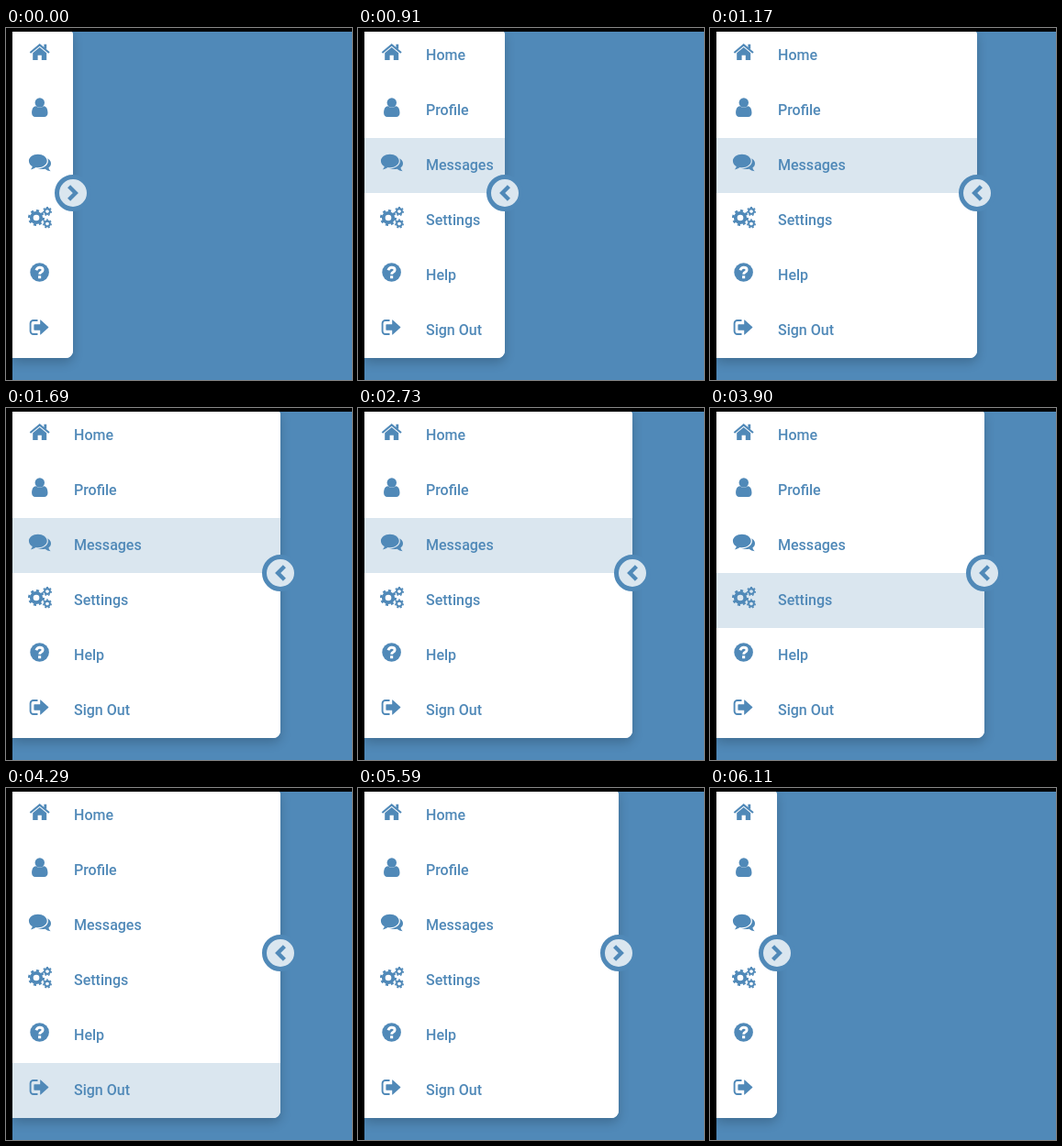
Animation, 377 px wide and 384 px high, one loop 7410 ms. Source, as an HTML page:

```html
<!DOCTYPE html>
<html lang="en">
<head>
<meta charset="utf-8">
<title>Expanding sidebar</title>
<style>
  :root { --blue: #5089b8; --tint: #dae6ef; }
  html, body { margin: 0; width: 100%; height: 100%; overflow: hidden; background: #000; }
  #stage {
    position: absolute; left: 7px; top: 4px; width: 370px; height: 380px;
    overflow: hidden; background: var(--blue);
  }
  #panel {
    position: absolute; left: 0; top: -4px; width: 66px; height: 360px;
    border-radius: 0 8px 8px 0; box-shadow: 0 5px 12px rgba(0, 0, 0, .2);
  }
  ul {
    margin: 0; padding: 0; width: 100%; height: 100%; list-style: none;
    overflow: hidden; border-radius: inherit; background: #fff;
  }
  li {
    --row: #fff; position: relative; height: 60px; background: var(--row);
    font: 500 16px/60px Roboto, sans-serif; color: var(--blue); white-space: nowrap;
  }
  li.active { --row: var(--tint); }
  li span { position: absolute; left: 67px; top: 0; }
  li svg { position: absolute; left: 0; top: 0; width: 60px; height: 60px; fill: var(--blue); }
  .line { fill: none; stroke: var(--blue); }
  .gap { stroke: var(--row); stroke-width: 2.4; }
  .teeth { stroke-dasharray: 1 1; }
  #toggle {
    position: absolute; right: -20px; top: 160px; width: 30px; height: 30px;
    border: 5px solid var(--blue); border-radius: 50%; background: var(--tint);
  }
  #toggle svg { display: block; width: 30px; height: 30px; }
  .open #toggle svg { transform: scaleX(-1); }
</style>
</head>
<body>
<div id="stage">
  <div id="panel">
    <ul id="menu"></ul>
    <div id="toggle">
      <svg viewBox="-15 -15 30 30"><path class="line" stroke-width="4.4" d="M-4.4 -7.2 2.8 0 -4.4 7.2"/></svg>
    </div>
  </div>
</div>
<script>
const gear = (x, y, r, teeth) => `
  <g class="line" transform="translate(${x} ${y})">
    <circle r="${r * .58}" stroke-width="${r * .42}"/>
    <circle class="teeth" r="${r * .86}" stroke-width="${r * .28}" pathLength="${teeth * 2}"/>
  </g>`;

const items = [
  ["Home", `
    <path d="M29.2 27.2 36.7 21l7.5 6.2V35h-5.4v-5.2h-4.2V35h-5.4z"/>
    <path d="M41.4 17.8h2.8v5h-2.8z"/>
    <path class="line" stroke-width="2.1" d="M26.4 27 36.7 18.4 47 27"/>`],
  ["Profile", `
    <path d="M32.4 25.2q4.4 3.4 8.8 0c3 .2 4.3 3.6 4.3 7.6 0 2.6-1.5 4.2-3.8 4.2h-9.8c-2.3 0-3.8-1.6-3.8-4.2 0-4 1.300-7.400 4.300-7.600z"/>
    <circle cx="36.800" cy="21.500" r="5.200"/>`],
  ["Messages", `
    <path d="M40 21c5 0 9 3 9 6.700 0 2-1 3.500-2.600 4.700q.5 2 2.200 3.800-3.600-.2-6-2.400c-5 .8-9-.4-11-2.800z"/>
    <path class="gap" paint-order="stroke" d="M34.800 17.800c5.500 0 9.900 3.200 9.900 7.200s-4.400 7.200-9.900 7.200q-1.200 0-2.200-.2-2.400 2-5.800 2.400 1.600-1.600 2-3.400c-2.400-1.300-3.900-3.400-3.900-6 0-4 4.400-7.200 9.900-7.200z"/>`],
  ["Settings", gear(33, 27, 9, 8) + gear(45, 20, 5, 7) + gear(45, 33.500, 5, 7)],
  ["Help", `
    <circle cx="36.600" cy="26.500" r="10.300"/>
    <path fill="none" stroke="var(--row)" stroke-width="2.900" d="M32.900 24.200q1.200-2.900 3.800-2.900 3.400 0 3.400 2.700 0 1.300-1.700 2.300-1.700.900-1.700 2.500"/>
    <path fill="var(--row)" d="M35.100 30.300h3.100v2.900h-3.100z"/>`],
  ["Sign Out", `
    <path class="line" stroke-width="1.900" d="M34.500 19h-4.700a3.200 3.200 0 0 0-3.200 3.200v8.600a3.200 3.200 0 0 0 3.200 3.200h4.700"/>
    <path d="M31 23.300h6.200v-4.400q0-1 .9-.2l8 7.200q.7.600 0 1.200l-8 7.200q-.9.800-.9-.2v-4.400H31q-.6 0-.6-.6v-5.200q0-.6.6-.6z"/>`]
];

const panel = document.getElementById("panel");
const menu = document.getElementById("menu");
menu.innerHTML = items.map(([label, icon]) =>
  `<li><svg viewBox="7 0 60 60">${icon}</svg><span>${label}</span></li>`).join("");

const [HOME, PROFILE, MESSAGES, SETTINGS, HELP, SIGN_OUT, NONE] = [0, 1, 2, 3, 4, 5, -1];
const LOOP = 7410;

// Start time in ms, panel width, hovered row
const poses = [
  [0, 66, NONE],
  [910, 153, MESSAGES], [1040, 247, MESSAGES], [1170, 284, MESSAGES],
  [1300, 292, SETTINGS], [1690, 292, MESSAGES], [1950, 292, SETTINGS],
  [2730, 292, MESSAGES], [2860, 292, PROFILE], [2990, 292, HOME],
  [3510, 292, PROFILE], [3640, 292, MESSAGES], [3900, 292, SETTINGS],
  [4030, 292, HELP], [4290, 292, SIGN_OUT], [4940, 292, NONE],
  [5590, 277, NONE], [5720, 163, NONE], [5850, 92, NONE], [5980, 69, NONE],
  [6110, 66, NONE]
];

const start = performance.now();

function draw() {
  const time = Math.max(0, performance.now() - start) % LOOP;
  const [, width, hovered] = poses.findLast(([from]) => from <= time);
  panel.style.width = width + "px";
  panel.classList.toggle("open", time >= 910 && time < 5590);
  [...menu.children].forEach((row, i) => row.classList.toggle("active", i === hovered));
  requestAnimationFrame(draw);
}
draw();
</script>
</body>
</html>
```
